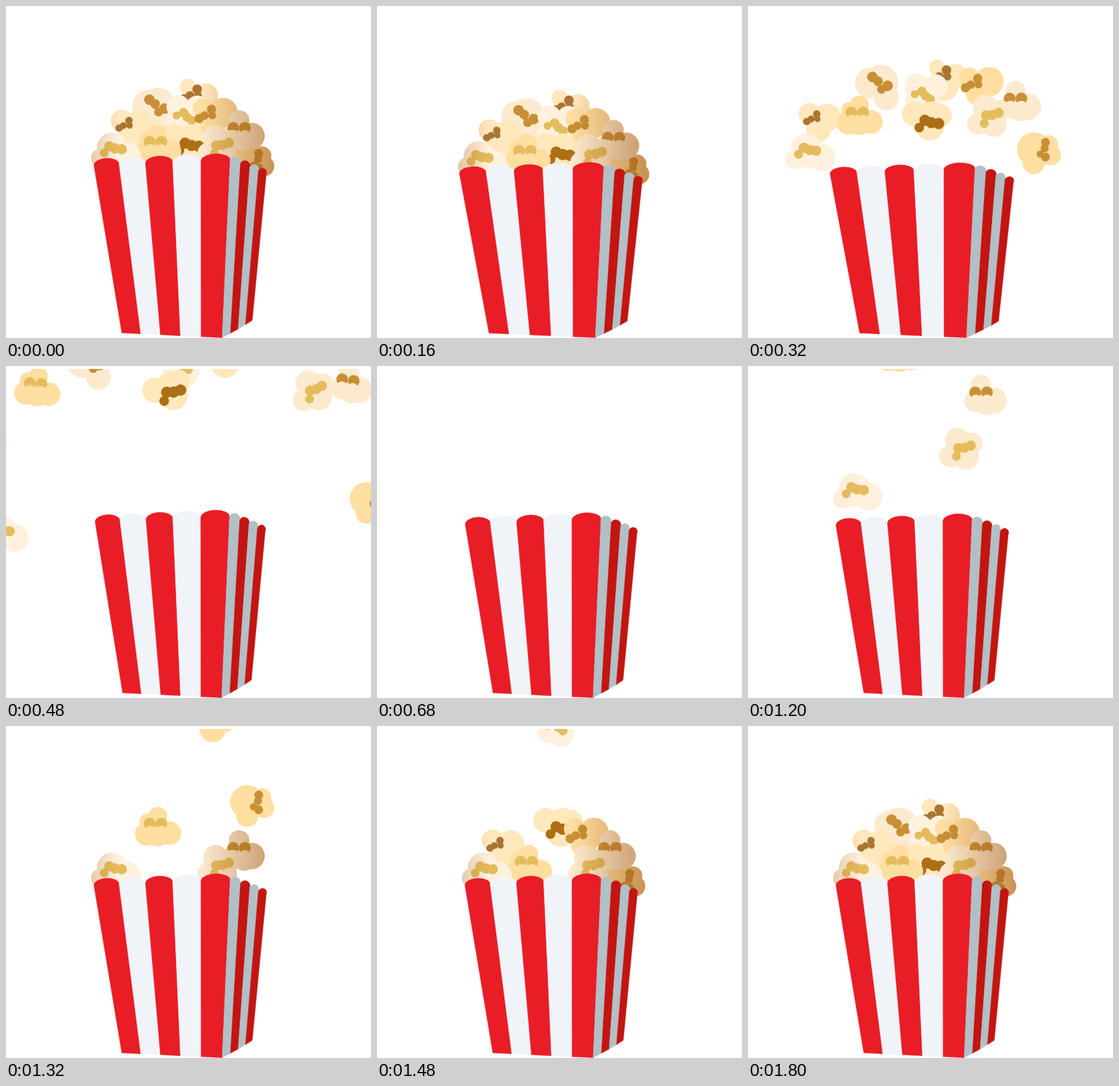
These frames come from a looping animation (498 by 452 pixels, 1920 ms). An HTML page with a canvas:

```html
<!DOCTYPE html>
<html lang="en">
<head>
<meta charset="utf-8">
<title>Popcorn</title>
<style>
  html, body { margin: 0; width: 100%; height: 100%; overflow: hidden; background: #fff; }
  canvas { display: block; width: 498px; height: 452px; }
</style>
</head>
<body>
<canvas id="stage" width="498" height="452"></canvas>
<script>
(() => {
  const ctx = document.getElementById('stage').getContext('2d');
  const LOOP = 1920, STEP = 40;
  const LAUNCH = 240, SPREAD = 320, FAR = 480, GONE = 640;
  const FALL_SPEED = 1.3;
  const BASE = { x: 245, y: 451 };
  const RED = '#e81d26', WHITE = '#f0f4f8', DEEP = '#c31511', GREY = '#b1c0c6';
  const BUTTER = '#ffdea1', PALE = '#ffe8bb', CREAM = '#fff1de', PEACH = '#fceacf';
  const GOLD = '#e4bc5c', AMBER = '#c88f37', BROWN = '#ab7433', DARK = '#ad6f14';

  const lerp = (a, b, k) => a + (b - a) * k;
  const clamp = v => Math.max(0, Math.min(1, v));

  function blob(circles) {
    const path = new Path2D();
    for (const [x, y, r] of circles) {
      path.moveTo(x + r, y);
      path.arc(x, y, r, 0, 7);
    }
    return path;
  }

  // Kernel shapes around their own centre; the paw's lower half is covered again.
  const KERNELS = {
    paw: blob([[-8, 0, 8], [8, 0, 8]]),
    bean: blob([[-13, 5, 6], [-6, -4, 7], [2, -1, 7], [11, 0, 7]]),
    knot: blob([[-8, 5, 6], [-1, 1, 5.5], [8, -7, 6], [9, 1, 5]]),
  };
  const PAW_COVER = blob([[-7, 11, 8], [8, 11, 8]]);

  // Bodies are placed where they hang when the burst has just opened.
  // rest, far: offsets to the bucket and to a later point of the flight.
  const pieces = [];
  function piece(color, body, kernel, motion) {
    const mid = i => (Math.min(...body.map(c => c[i] - c[2])) + Math.max(...body.map(c => c[i] + c[2]))) / 2;
    pieces.push({ color, body: blob(body), cx: mid(0), cy: mid(1), kernel, spin: 0, ...motion });
  }

  piece(PALE, [[258, 84, 11], [283, 95, 16], [267, 108, 21]],
    { kind: 'knot', tint: BROWN, x: 262, y: 95, size: 1.1, turn: 0 },
    { rest: [-10, 26], far: [32, -113], land: 1780 });
  piece(PEACH, [[167, 105, 21], [181, 104, 24], [189, 125, 17]],
    { kind: 'knot', tint: AMBER, x: 179, y: 103, size: 1.2, turn: 67 },
    { rest: [26, 31], far: [-63, -110], land: 1660 });
  piece(CREAM, [[230, 108, 16], [256, 109, 16], [230, 128, 16], [246, 131, 18]],
    { kind: 'bean', tint: GOLD, x: 240, y: 122, size: .9, turn: 30 },
    { rest: [5, 29], far: [0, -122], land: 1595 });
  piece(PALE, [[227, 147, 17], [250, 148, 18], [262, 149, 16], [248, 163, 20]],
    { kind: 'bean', tint: DARK, x: 248, y: 160, size: 1.1, turn: 0 },
    { rest: [3, 31], far: [-22, -121], spin: -22, land: 1518 });
  piece(BUTTER, [[302, 98, 14], [329, 103, 20], [315, 118, 18]],
    { kind: 'knot', tint: AMBER, x: 305, y: 106, size: 1.05, turn: 0 },
    { rest: [-33, 42], far: [70, -134], land: 1440 });
  piece(PALE, [[84, 147, 15], [108, 152, 19], [96, 168, 17]],
    { kind: 'knot', tint: BROWN, x: 87, y: 153, size: .85, turn: 0 },
    { rest: [74, 9], far: [-126, -50], land: 1475 });
  piece(BUTTER, [[152, 135, 13], [138, 142, 11], [137, 159, 16], [168, 158, 16], [152, 161, 15]],
    { kind: 'paw', tint: GOLD, x: 149, y: 145, size: 1, turn: 0 },
    { rest: [55, 40], far: [-109, -121], spin: 5, land: 1360 });
  piece(CREAM, [[80, 195, 21], [64, 209, 13], [100, 206, 19], [82, 208, 13]],
    { kind: 'bean', tint: GOLD, x: 82, y: 197, size: 1, turn: 0 },
    { rest: [65, -2], far: [-88, 28], land: 1220 });
  piece(BUTTER, [[390, 195, 23], [390, 214, 15], [410, 189, 13], [413, 203, 14]],
    { kind: 'knot', tint: AMBER, x: 405, y: 195, size: 1, turn: 127 },
    { rest: [-61, 15], far: [102, -14], land: 1402 });
  piece(PEACH, [[365, 116, 14], [382, 137, 18], [357, 138, 15], [372, 140, 17]],
    { kind: 'paw', tint: AMBER, x: 365, y: 126, size: 1, turn: 0 },
    { rest: [-47, 40], far: [101, -106], spin: 8, land: 1300 });
  piece(PEACH, [[324, 138, 17], [344, 142, 14], [314, 160, 15], [335, 160, 18]],
    { kind: 'bean', tint: GOLD, x: 332, y: 150, size: 1, turn: -25 },
    { rest: [-38, 41], far: [90, -116], spin: -10, land: 1260 });

  // Stripe borders: five on the front, four on the side, narrowing with perspective.
  const curve = (start, step, bend, n) => start + step * n + bend * n * n;
  const borders = Array.from({ length: 10 }, (_, i) => {
    const side = i - 5;
    return i <= 5
      ? { rim: [curve(120, 33.8, .675, i), 217 - 1.5 * i], foot: [curve(158, 25.65, .35, i), 445 + 1.3 * i] }
      : { rim: [curve(306, 14.4, -.54, side), 209.5 + 5.1 * side], foot: [curve(295, 11.6, -.34, side), 451.5 - 5.9 * side] };
  });
  const stripeColor = i => i < 5 ? [RED, WHITE][i % 2] : [DEEP, GREY][i % 2];

  // Key points of the squash: time, scale x, scale y.
  const squash = [[0, 1, 1], [240, 1.09, .93], [320, 1.064, .951], [480, .987, 1.02], [760, 1, 1], [LOOP, 1, 1]];

  function bucketScale(t) {
    const i = squash.findIndex(key => key[0] > t);
    const [t0, ...from] = squash[i - 1], [t1, ...to] = squash[i];
    return from.map((v, n) => lerp(v, to[n], (t - t0) / (t1 - t0)));
  }

  function drawBucket([sx, sy]) {
    ctx.save();
    ctx.translate(BASE.x, BASE.y);
    ctx.scale(sx, sy);
    ctx.translate(-BASE.x, -BASE.y);
    ctx.lineWidth = .5;
    for (let i = 0; i < 9; i++) {
      const a = borders[i], b = borders[i + 1];
      const [x1, y1] = a.rim, [x2, y2] = b.rim;
      ctx.beginPath();
      ctx.moveTo(...a.foot);
      ctx.lineTo(x1, y1);
      ctx.ellipse((x1 + x2) / 2, (y1 + y2) / 2, Math.hypot(x2 - x1, y2 - y1) / 2, i < 5 ? 9 : 6.5,
        Math.atan2(y2 - y1, x2 - x1), Math.PI, 2 * Math.PI);
      ctx.lineTo(...b.foot);
      ctx.closePath();
      ctx.fillStyle = ctx.strokeStyle = stripeColor(i);
      ctx.fill();
      ctx.stroke();
    }
    ctx.restore();
  }

  function pose(p, t, [sx, sy]) {
    const [rx, ry] = p.rest;
    if (t >= GONE) {
      const above = Math.max(0, (p.land - t) * FALL_SPEED);
      return { x: rx, y: ry - above, spin: 0, shade: clamp(1 - above / 30) };
    }
    if (t >= SPREAD) {
      const k = (t - SPREAD) / (FAR - SPREAD);
      return { x: p.far[0] * k, y: p.far[1] * k, spin: p.spin * k, shade: 0 };
    }
    // Ride the squashed bucket, then burst outwards.
    const k = clamp((t - LAUNCH) / (SPREAD - LAUNCH));
    const x = BASE.x + (p.cx + rx - BASE.x) * sx - p.cx;
    const y = BASE.y + (p.cy + ry - BASE.y) * sy - p.cy;
    return { x: lerp(x, 0, k), y: lerp(y, 0, k), spin: 0, shade: 1 - k };
  }

  // The heap darkens towards both ends.
  function heapShade(x, strength) {
    const g = ctx.createLinearGradient(116 - x, 0, 366 - x, 0);
    const stop = (at, alpha) => g.addColorStop(at, `rgba(155,85,20,${alpha * strength})`);
    stop(0, .25);
    stop(.15, 0);
    stop(.6, 0);
    stop(1, .55);
    return g;
  }

  function drawPiece(p, { x, y, spin, shade }) {
    const k = p.kernel;
    ctx.save();
    ctx.translate(p.cx + x, p.cy + y);
    ctx.rotate(spin * Math.PI / 180);
    ctx.translate(-p.cx, -p.cy);
    ctx.fillStyle = p.color;
    ctx.fill(p.body);
    ctx.save();
    ctx.translate(k.x, k.y);
    ctx.rotate(k.turn * Math.PI / 180);
    ctx.scale(k.size, k.size);
    ctx.fillStyle = k.tint;
    ctx.fill(KERNELS[k.kind]);
    ctx.fillStyle = p.color;
    if (k.kind === 'paw') ctx.fill(PAW_COVER);
    ctx.restore();
    if (shade > 0) {
      ctx.fillStyle = heapShade(x, shade);
      ctx.fill(p.body);
    }
    ctx.restore();
  }

  function draw(t) {
    ctx.fillStyle = '#fff';
    ctx.fillRect(0, 0, 498, 452);
    ctx.save();
    ctx.beginPath();
    ctx.rect(0, 4, 498, 448);
    ctx.clip();
    const scale = bucketScale(t);
    const flying = t >= SPREAD && t < GONE;
    if (flying) drawBucket(scale);
    for (const p of pieces) drawPiece(p, pose(p, t, scale));
    if (!flying) drawBucket(scale);
    ctx.restore();
  }

  const start = performance.now();
  function tick() {
    const t = Math.max(0, performance.now() - start) % LOOP;
    draw(Math.floor(t / STEP) * STEP);
    requestAnimationFrame(tick);
  }
  tick();
})();
</script>
</body>
</html>
```
